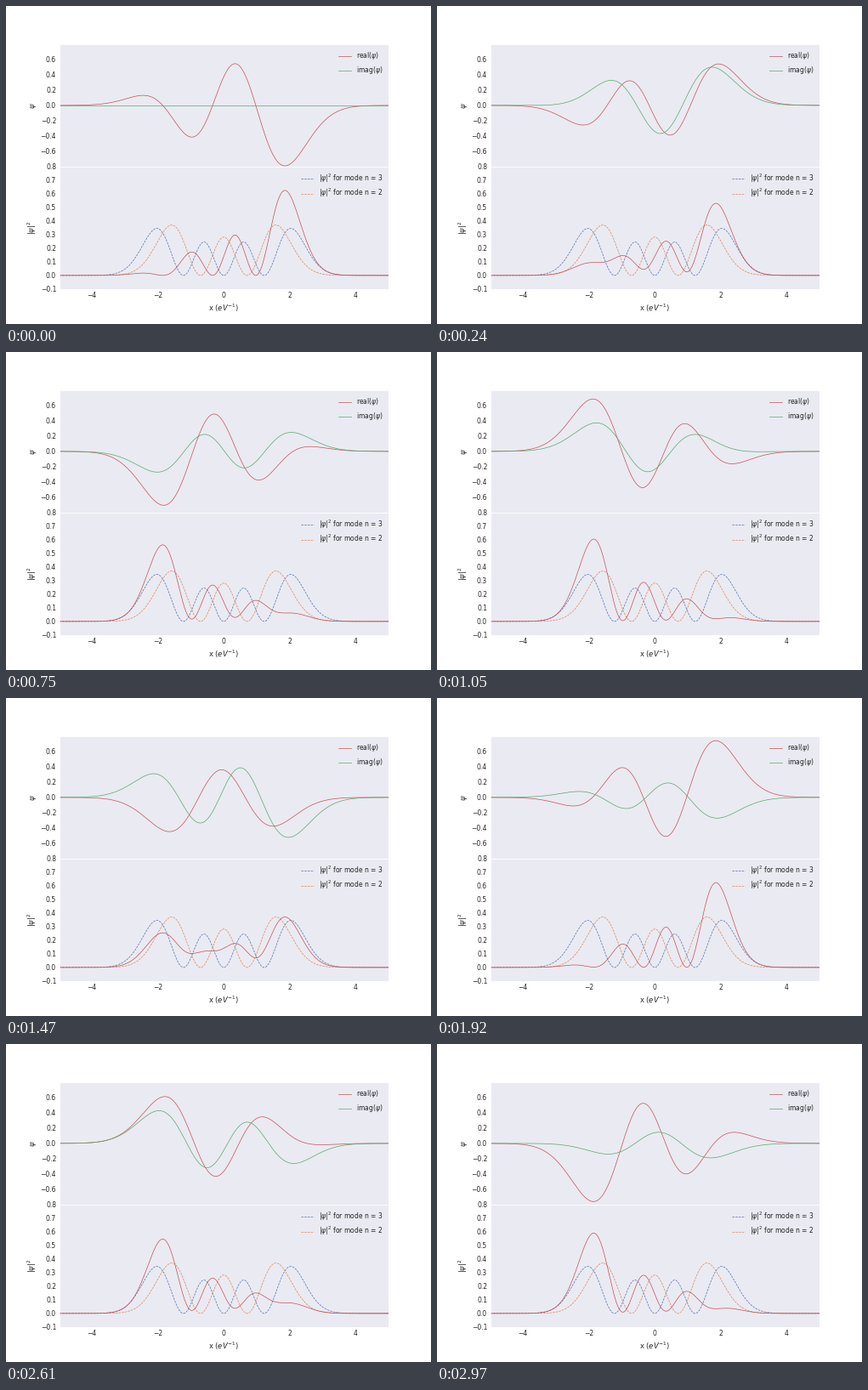
A matplotlib script that plays this animation: 500x374 px, repeating every 3000 ms.

```python
import math

import matplotlib.pyplot as plt
import numpy as np
from matplotlib.animation import FuncAnimation
from matplotlib.lines import Line2D

W, H, DPI = 500, 374, 50
FRAMES, INTERVAL = 100, 30
DT = 0.1

RED, GREEN, BLUE, ORANGE = "#c44e52", "#55a868", "#4c72b0", "#dd8452"
PANEL, INK = "#eaeaf2", "#262626"

plt.rcParams.update({
    "font.family": "DejaVu Sans",
    "mathtext.fontset": "dejavusans",
    "text.color": INK,
    "axes.labelcolor": INK,
    "axes.labelsize": 12,
    "axes.facecolor": PANEL,
    "axes.edgecolor": "white",
    "axes.linewidth": 1.25,
    "lines.linewidth": 1,
})


def mode(n, x):
    """Harmonic oscillator eigenfunction."""
    coeffs = [0] * n + [1]
    norm = math.sqrt(2**n * math.factorial(n) * math.sqrt(math.pi))
    return np.polynomial.hermite.hermval(x, coeffs) * np.exp(-x**2 / 2) / norm


x = np.linspace(-5, 5, 600)
phi2, phi3 = mode(2, x), mode(3, x)


def wave(t):
    """Equal mix of modes 2 and 3, with energies n + 1/2."""
    return -(phi2 * np.exp(-2.5j * t) + phi3 * np.exp(-3.5j * t)) / math.sqrt(2)


fig, (top, low) = plt.subplots(2, 1, sharex=True, figsize=(W / DPI, H / DPI), dpi=DPI)
fig.set_facecolor("white")
fig.subplots_adjust(left=0.125, right=0.9, bottom=0.11, top=0.88, hspace=0)

top.set(xlim=(-5, 5), ylim=(-0.8, 0.8), ylabel=r"$\psi$")
top.set_yticks(np.arange(-3, 4) * 0.2)
low.set(ylim=(-0.1, 0.8), ylabel=r"$|\psi|^2$", xlabel=r"x ($eV^{-1}$)")
low.set_yticks(np.arange(-1, 9) * 0.1)
low.set_xticks(range(-4, 5, 2))
for ax in (top, low):
    ax.tick_params(length=0, pad=5, labelsize=11, labelcolor=INK)

real_line, = top.plot(x, phi2, color=RED)
imag_line, = top.plot(x, phi2, color=GREEN)
low.plot(x, phi3**2, "--", color=BLUE)
low.plot(x, phi2**2, "--", color=ORANGE)
prob_line, = low.plot(x, phi2**2, color=RED)


def key(left, y, color, style, label):
    """Legend row at pixel position, y measured from the top."""
    row = 1 - y / H
    fig.add_artist(Line2D([left / W, (left + 15.3) / W], [row, row],
                          color=color, linestyle=style))
    fig.text((left + 21.6) / W, 1 - (y + 2.7) / H, label, fontsize=11, va="baseline")


key(390.5, 58.5, RED, "-", r"real($\psi$)")
key(390.5, 75.5, GREEN, "-", r"imag($\psi$)")
key(346.5, 203.5, BLUE, "--", r"$|\psi|^2$ for mode n = 3")
key(346.5, 220.5, ORANGE, "--", r"$|\psi|^2$ for mode n = 2")


def update(i):
    psi = wave(i * DT)
    real_line.set_ydata(psi.real)
    imag_line.set_ydata(psi.imag)
    prob_line.set_ydata(np.abs(psi)**2)
    return real_line, imag_line, prob_line


anim = FuncAnimation(fig, update, frames=FRAMES, interval=INTERVAL,
                     repeat=True, repeat_delay=0)
plt.show()
```
